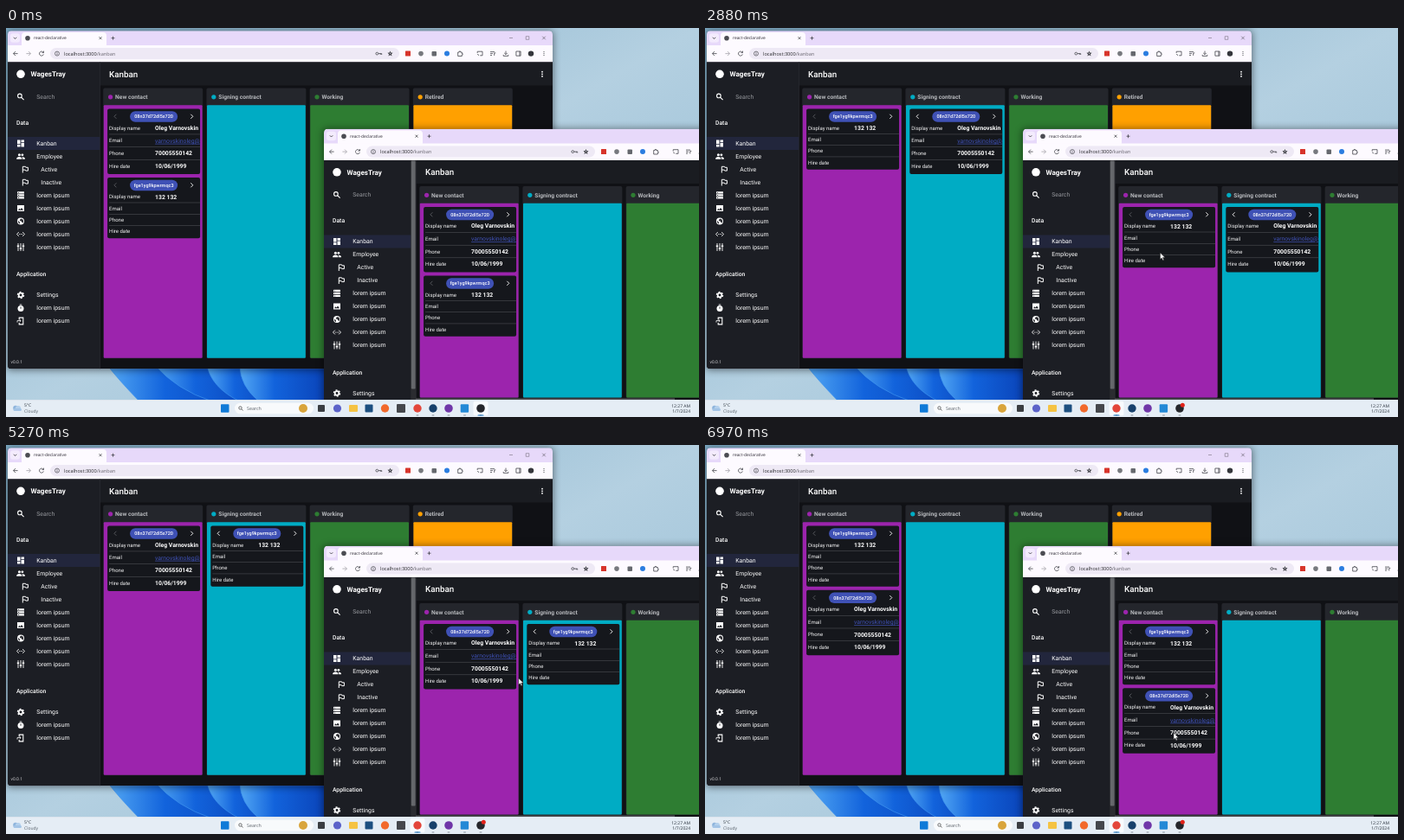
Animation of 800x450 px, one loop 7 s. Source, as an HTML page:

```html
<!DOCTYPE html>
<html lang="en">
<head>
<meta charset="utf-8">
<title>Kanban</title>
<style>
html, body { margin: 0; width: 100%; height: 100%; overflow: hidden; background: #a9c8dc; }
svg { display: block; width: 100vw; height: 100vh; }
text { font-family: Roboto, sans-serif; text-rendering: geometricPrecision; white-space: pre; }
.ui { font-family: "Open Sans", sans-serif; }
</style>
</head>
<body>
<svg id="stage" viewBox="0 0 800 450" xmlns="http://www.w3.org/2000/svg"></svg>
<script>
const LOOP = 7000;
const BLUE = '#3f51b5', INK = '#303136', PALE = '#c9cacd';
const COLS = [
  ['New contact', '#9c24ad'], ['Signing contract', '#00acc4'],
  ['Working', '#2e7d32'], ['Retired', '#ffa000']
];
const colX = i => 112.8 + i * 119.2;

// Markup helpers; text is placed by its vertical middle.
const rect = (x, y, w, h, fill, rx = 0, more = '') =>
  `<rect x="${x}" y="${y}" width="${w}" height="${h}" rx="${rx}" fill="${fill}" ${more}/>`;
const dot = (x, y, r, fill, more = '') => `<circle cx="${x}" cy="${y}" r="${r}" fill="${fill}" ${more}/>`;
const text = (x, y, s, size, fill, more = '') =>
  `<text x="${x}" y="${y + size * .36}" font-size="${size}" fill="${fill}" ${more}>${s}</text>`;
const stroke = (x, y, d, color, w = 1) =>
  `<path transform="translate(${x} ${y})" d="${d}" fill="none" stroke="${color}" stroke-width="${w}"/>`;
const solid = (x, y, d, color) =>
  `<path transform="translate(${x} ${y})" d="${d}" fill="${color}" fill-rule="evenodd"/>`;
const group = (x, y, body, more = '') => `<g transform="translate(${x} ${y})" ${more}>${body}</g>`;
const bold = 'font-weight="700"', medium = 'font-weight="500"', ui = 'class="ui"';

const LEFT = 'M1.3-2.5l-2.5 2.5 2.5 2.5', RIGHT = 'M-1.3-2.5l2.5 2.5-2.5 2.5', DOWN = 'M-1.7-.8l1.7 1.7 1.7-1.7';
const ICONS = {
  search: (x, y) => stroke(x, y, 'M1.2-.9a2.3 2.3 0 1 0-4.6 0a2.3 2.3 0 1 0 4.6 0M.6.8l3 3', '#fff', 1.1),
  board: (x, y) => solid(x, y, 'M-4-4h3.5v4.5h-3.5zM.5-4h3.5v2.7h-3.5zM-4 1.3h3.5v2.7h-3.5zM.5-.4h3.5v4.4h-3.5z', '#fff'),
  people: (x, y) => dot(x - 1.6, y - 1.7, 1.5, '#fff') + dot(x + 1.9, y - 1.7, 1.4, '#fff') +
    solid(x, y, 'M-4.8 3.2v-1.2q3.2-2.8 6.2 0v1.2zM2.1 3.2v-1.5l-.8-1q2.4-.3 3.6 1.3v1.2z', '#fff'),
  flag: (x, y) => stroke(x, y, 'M-2.7 4v-7.2h3.2l.4 1h2.5v3.8h-2.7l-.5-1h-2.9', '#fff'),
  store: (x, y) => [-3, 0, 3].map(d => rect(x - 4, y + d - 1.2, 8, 2.3, '#fff', .4) + dot(x - 2.4, y + d, .55, INK)).join(''),
  image: (x, y) => solid(x, y, 'M-4-3.5h8v7h-8zM-3 2.3h6l-2-2.8-1.5 2-1.1-1.2z', '#fff'),
  globe: (x, y) => dot(x, y, 4, '#fff') + solid(x, y, 'M-3.2-.8l2.2 2v2q-2.4-1-2.2-4zM1-3l1.9 1.6.3 2.6-1.2.8-1.2-1.8-2-1 .3-1.3z', INK),
  arrows: (x, y) => stroke(x, y, 'M-2.2-2.4l-2.3 2.4 2.3 2.4M2.2-2.4l2.3 2.4-2.3 2.4', '#fff', .9) +
    [-1.7, 0, 1.7].map(d => dot(x + d, y, .55, '#fff')).join(''),
  sliders: (x, y) => [-3, 0, 3].map((d, i) => stroke(x + d, y, 'M0-4.5v9', '#fff', .9) +
    rect(x + d - 1.2, y + (i % 2 ? .8 : -2), 2.4, 1.6, '#fff')).join(''),
  gear: (x, y) => dot(x, y, 2.3, 'none', 'stroke="#fff" stroke-width="1.7"') +
    dot(x, y, 3.6, 'none', 'stroke="#fff" stroke-width="1.3" stroke-dasharray="1.9 1.87"'),
  timer: (x, y) => dot(x, y + .5, 3.5, '#fff') + rect(x - 1.3, y - 4.4, 2.6, .9, '#fff') + stroke(x, y, 'M0-1.5v2.3', INK, .9),
  phone: (x, y) => stroke(x, y, 'M-1.8-1.5v-2.4h4.6v7.8h-4.6v-2', '#fff', 1.1) + stroke(x, y, 'M-4 1.6v-2h4M-1.3-1.8l1.5 1.4-1.5 1.4', '#fff', .8)
};

const MENU = [
  ['board', 'Kanban', 133.5], ['people', 'Employee', 148.5], ['flag', 'Active', 163.5, 5], ['flag', 'Inactive', 178.5, 5],
  ['store', 'lorem ipsum', 193.5], ['image', 'lorem ipsum', 208.5], ['globe', 'lorem ipsum', 223.5],
  ['arrows', 'lorem ipsum', 238.5], ['sliders', 'lorem ipsum', 253.5],
  ['gear', 'Settings', 309], ['timer', 'lorem ipsum', 324], ['phone', 'lorem ipsum', 339]
];

const CARDS = {
  a: { id: '08n37d72dl5s720', h: 75.5, rows: [22, 36.8, 51.5, 66],
       vals: ['Oleg Varnovskin', 'varnovskinoleg@example', '70005550142', '10/06/1999'] },
  b: { id: 'fge1yg9kpwrmqc3', h: 70.3, rows: [22.3, 35.6, 48.8, 62], vals: ['132 132', '', '', ''] }
};
const LABELS = ['Display name', 'Email', 'Phone', 'Hire date'];

function card(key, x, y, col) {
  const { id, h, rows, vals } = CARDS[key];
  let s = rect(0, 0, 107, h, '#15171c', 2) + rect(26, 2.8, 55, 12.4, BLUE, 6.2) +
    text(53.5, 8.9, id, 5.5, '#fff', 'text-anchor="middle" ' + medium) +
    stroke(9, 8.8, LEFT, col ? '#fff' : '#5c5e63', .9) + stroke(97.5, 8.8, RIGHT, '#fff', .9);
  rows.forEach((r, i) => {
    if (i) s += rect(2, (r + rows[i - 1]) / 2 - .2, 105, .5, '#55575c');
    s += text(2, r, LABELS[i], 6, '#f4f4f5');
    s += i === 1
      ? text(55, r, vals[i], 6.8, BLUE, 'text-decoration="underline" clip-path="url(#cardClip)"')
      : text(55, r, vals[i], 6.8, '#fff', bold);
  });
  return group(x, y, s);
}

const stack = lists => lists.map((list, col) => {
  let y = 93.5;
  return [...list].map(key => {
    const s = card(key, colX(col) + 4.3, y, col);
    y += CARDS[key].h + 4;
    return s;
  }).join('');
}).join('');

function toolbar(shift) {
  const x = v => v + shift, y = 29.6, c = '#45464c';
  return stroke(11, y, 'M2.6 0h-5M0-2.5l-2.5 2.5 2.5 2.5', c, .8) +
    stroke(26, y, 'M-2.6 0h5M0-2.5l2.5 2.5-2.5 2.5', '#a5a3aa', .8) +
    stroke(41, y, 'M2.2-1.2a2.5 2.5 0 1 0 .2 2M2.5-3v2h-2', c, .8) +
    rect(51, 23, x(454) - 51, 13, '#eee9f5', 6.5) +
    dot(59, y, 2.5, 'none', `stroke="${c}" stroke-width=".7"`) + stroke(59, y, 'M0-.4v1.8M0-1.5v.6', c, .7) +
    text(67, y, 'localhost:3000<tspan fill="#696670">/kanban</tspan>', 5.6, '#28282c', ui) +
    dot(x(428.3), y, 1.4, 'none', `stroke="${c}" stroke-width=".8"`) + stroke(x(430), y, 'M0 0h3.7v1.4M2.3 0v1.2', c, .8) +
    solid(x(443.5), y, 'M0-3l.9 2 2.2.2-1.7 1.4.6 2.2-2-1.2-2 1.2.6-2.2-1.7-1.4 2.2-.2zM0-1.2l-.5 1.2.5 1 .5-1z', c) +
    rect(x(461), 26.6, 6, 6, '#d7342b', .5) + dot(x(479), y, 2.8, '#77797e') + rect(x(491.5), 27, 5.5, 5.5, '#66686e', 1) +
    dot(x(509), y, 3, '#2b7de0') + stroke(x(524), y, 'M-2.3-1.6h1.5v-1h1.5v1h1.6v1.5h.8v1.5h-.8v1.5h-4.6z', c, .8) +
    stroke(x(547), y, 'M-2.8-.6v-1.8h5.8v4.6h-2.8M-2.8.8q1.4 0 1.4 1.4', c, .8) +
    stroke(x(562), y, 'M-3-2h5M-3 0h3M-3 2h2M1.7 2.3v-3h1.6', c, .8) +
    stroke(x(577), y, 'M0-3v4M-1.8-.7l1.8 1.8 1.8-1.8M-2.8 1.3v1.5h5.6v-1.5', c, .8) +
    stroke(x(591.5), y, 'M-2.6-2.6h5.2v5.2h-5.2zM1.4-2.6v5.2', c, .8) +
    dot(x(606), y, 3.2, '#34353b') + [-2, 0, 2].map(d => dot(x(621), y + d, .6, c)).join('');
}

function browser(n, x, y, w, h, colEnd, shift) {
  let s = rect(2, 3.2, w, h, '#e7d9fa', 4) +
    rect(5, 6.3, 11, 10.5, '#f3ebfd', 3) + stroke(10.5, 11.6, DOWN, INK, .8) +
    rect(18, 5, 98, 18, '#fdfaff', 4) + rect(2, 20, w, 19.5, '#fdfaff') +
    dot(25, 11.7, 2.8, '#4b4c52') + text(32, 11.7, 'react-declarative', 4.9, '#2d2b33', ui) +
    stroke(109, 11.7, 'M-1.5-1.5l3 3M1.5-1.5l-3 3', INK, .7) + stroke(123.5, 11.7, 'M-2 0h4M0-2v4', INK, .7) +
    stroke(583, 11.5, 'M-2 0h4', '#77717f', .6) + stroke(602, 11.5, 'M-1.8-1.8h3.6v3.6h-3.6z', '#77717f', .6) +
    stroke(621, 11.5, 'M-1.8-1.8l3.6 3.6M1.8-1.8l-3.6 3.6', '#55505c', .6) + toolbar(shift);

  s += rect(2, 39.5, w, h - 36.3, '#101115') + rect(108, 39.5, w - 106, 27, '#1a1c21') +
    rect(2, 39.5, 106.5, h - 36.3, '#1c1e24') + rect(108.3, 39.5, .5, h, '#303238') +
    dot(17, 53.3, 4.8, '#fff') + text(28.5, 53.2, 'WagesTray', 8.1, '#fff', bold) +
    text(119, 53.2, 'Kanban', 9.8, '#fff', medium) +
    [-2.6, 0, 2.6].map(d => dot(619 + shift, 53.3 + d, .9, '#fff')).join('') +
    ICONS.search(17, 79.3) + text(35.3, 79.3, 'Search', 6.8, '#96989d') +
    text(12, 109.3, 'Data', 6.8, '#fff', medium) + text(12, 284.7, 'Application', 6.8, '#fff', medium) +
    rect(2, 126, 106.3, 15, '#22263c');
  for (const [icon, label, my, indent = 0] of MENU)
    s += ICONS[icon](17 + indent, my) + text(35.3 + indent, my, label, 6.9, '#fff');
  s += n ? rect(102.3, 39.5, 5.8, h, '#2b2c30') + rect(102.8, 40, 4.8, 264, '#65676b', 1)
         : text(5.5, 386, 'v0.0.1', 5, '#d0d1d4');

  COLS.forEach(([name, color], i) => {
    const cx = colX(i);
    s += rect(cx - .6, 69.5, 115, colEnd - 69, '#24262c', 2) +
      dot(cx + 7.8, 79.8, 2.6, color, `id="dot${n}${i}"`) + text(cx + 13.3, 79.8, name, 6.7, '#b6b8bc', bold) +
      rect(cx, 89.3, 113.8, colEnd - 89.3, color, 1, `id="col${n}${i}"`);
  });
  s += `<g id="cards${n}"></g>`;
  if (n) s += rect(108, 314.8, 299, 2, '#4a4b4f');
  return group(x, y, rect(1, 3, w + 2, h + 2, '#000', 4, 'opacity=".45" filter="url(#soft)"') +
    `<g clip-path="url(#win${n})">${s}</g>`);
}

const winClip = (n, w, h) => `<clipPath id="win${n}">${rect(2, 3.2, w, h, '#000', 4)}</clipPath>`;
const defs = `<defs>
  <linearGradient id="sky" x2="1" y2="1"><stop stop-color="#7fadc8"/><stop offset=".5" stop-color="#b4d0e1"/><stop offset="1" stop-color="#8fb8d1"/></linearGradient>
  <linearGradient id="petal"><stop stop-color="#53a8f4"/><stop offset=".4" stop-color="#1263dc"/><stop offset="1" stop-color="#0a43b8"/></linearGradient>
  <filter id="soft" x="-10%" y="-10%" width="120%" height="120%"><feGaussianBlur stdDeviation="4"/></filter>
  <clipPath id="cardClip">${rect(0, 0, 107, 80, '#000')}</clipPath>
  ${winClip(0, 629, 391)}${winClip(1, 490, 390)}</defs>`;

const wallpaper = rect(0, 0, 800, 450, 'url(#sky)') +
  ['M117 390q12 16 37 42h130q-75-15-90-42z', 'M172 390q24 28 66 42h50q-38-18-46-42z',
   'M232 390q5 26 38 42h42q-28-20-24-42z', 'M270 390q0 24 22 42h78v-42z']
    .map(d => `<path d="${d}" fill="url(#petal)" stroke="#3d92ee" stroke-width=".7"/>`).join('');

function taskbar() {
  const c = dot, y = 440;
  return rect(0, 430, 800, 20, '#e5edf5') + rect(0, 430, 800, .4, '#cfd9e3') +
    c(11, 439.5, 2.8, '#8fb5dc') + c(14, 440, 3.1, '#b4d0ec') + rect(8.5, 440, 9.5, 3, '#a3c4e6', 1.5) +
    text(21, 436.5, '5°C', 5, '#28313a', ui) + text(21, 443.4, 'Cloudy', 5, '#58616b', ui) +
    rect(248, 435.3, 9.5, 9.5, '#0f7ad8', .8) + rect(264, 433.7, 91, 12.6, '#f8fafc', 6.3) +
    stroke(271, y, 'M1.2-.5a1.7 1.7 0 1 0-3.4 0a1.7 1.7 0 1 0 3.4 0M.8.8l1.7 1.7', '#333', .7) +
    text(278, y, 'Search', 5.3, '#5a6067', ui) + c(343, y, 5, '#d9a53c') +
    rect(360, 436, 8, 8, '#3a3d42', 1) + c(382.5, y, 4.6, '#5b62c9') + rect(396, 436, 10, 8, '#f5c343', 1) +
    rect(414.5, 435.5, 9, 9, '#1c4f80', 1) + c(437.5, y, 4.7, '#f2692b') + rect(451, 435, 10, 10, '#45474c', 1) +
    rect(466.5, 431.7, 17, 16.6, '#f7fafd', 2, 'id="actBrowser"') + rect(539.5, 431.7, 17, 16.6, '#f7fafd', 2, 'id="actRec"') +
    c(475, y, 4.7, '#e3463a') + c(493, y, 4.7, '#17406b') + c(511, y, 4.8, '#7036a8') + rect(524.7, 435.3, 9.4, 9.4, '#2389d6', 1) +
    c(548, y, 4.8, '#25262b') + c(551.3, 436.3, 2.5, '#e2231a', 'id="rec"') +
    [475, 493, 511, 529.5, 548].map(x => rect(x - 1.5, 447.6, 3, .8, '#8a929b', .4)).join('') +
    rect(471.5, 447.4, 7, 1, '#1574c4', .5, 'id="barBrowser"') + rect(544.5, 447.4, 7, 1, '#1574c4', .5, 'id="barRec"') +
    text(790, 436.7, '12:27 AM', 5, '#28313a', 'class="ui" text-anchor="end"') +
    text(790, 443.6, '1/7/2024', 5, '#28313a', 'class="ui" text-anchor="end"');
}

const pointer = `<g id="pointer">
  <path d="M0 0v7.6l1.8-1.6 1.2 2.7 1.2-.5-1.2-2.6h2.5z" fill="#fff" stroke="#222" stroke-width=".45"/>
  <g id="moveMark">${rect(4.6, 7.4, 3, 3, '#e8e8e8', .3, 'stroke="#444" stroke-width=".6"')}</g></g>
  <g id="noDrop">${dot(2.5, 2.5, 2.8, '#fff', 'stroke="#b3202c" stroke-width="1"')}${stroke(2.5, 2.5, 'M-1.8-1.8l3.6 3.6', '#b3202c', 1)}</g>`;

const stage = document.getElementById('stage');
stage.innerHTML = defs + wallpaper + browser(0, 0, 0, 629, 391, 381.7, 0) +
  browser(1, 365, 113.5, 490, 390, 314, -139) + taskbar() + '<g id="ghost" opacity=".7"></g>' + pointer;
const $ = id => document.getElementById(id);

// Board contents per time: New contact, Signing contract.
const STATES = [[0, 'ab', ''], [2350, 'b', 'a'], [3850, '', 'ba'], [5000, 'a', 'b'], [6350, 'ba', '']];
// start, end, card, grab point inside the card, home column
const DRAGS = [
  [1500, 2350, 'a', 37, 49, 0], [3000, 3850, 'b', 39, 53, 0],
  [4250, 5000, 'a', 36.5, 25, 1], [5550, 6350, 'b', 50, 38.5, 1]
];
const PATH = [
  [0, 560, 470], [250, 560, 470], [800, 532, 300], [1210, 519, 255], [1500, 519, 256], [2200, 640, 270], [2350, 642, 270],
  [2880, 525.5, 260], [3000, 521, 260], [3730, 660, 337], [3850, 662, 338], [4250, 637.5, 306],
  [4700, 587, 298], [5000, 535, 293], [5550, 651, 245.5], [5970, 608, 298], [6350, 541, 328], [6970, 541, 333], [LOOP, 541, 333]
];

function pointerAt(t) {
  const i = Math.max(1, PATH.findIndex(p => p[0] > t));
  const [t0, x0, y0] = PATH[i - 1], [t1, x1, y1] = PATH[i];
  const k = (t - t0) / (t1 - t0), e = k * k * (3 - 2 * k);
  return [x0 + (x1 - x0) * e, y0 + (y1 - y0) * e];
}

const cache = {};
function fill(id, key, make) {
  if (cache[id] === key) return;
  cache[id] = key;
  $(id).innerHTML = make();
}
const show = (id, on) => $(id).setAttribute('visibility', on ? 'visible' : 'hidden');
const move = (id, x, y) => $(id).setAttribute('transform', `translate(${x} ${y})`);

function draw(t) {
  [150, 0].forEach((lag, n) => {
    const [, ...lists] = STATES.filter(s => s[0] === 0 || s[0] + lag <= t).pop();
    fill('cards' + n, lists.join('|'), () => stack(lists));
  });

  const [x, y] = pointerAt(t);
  const drag = DRAGS.find(d => t >= d[0] && t < d[1]);
  const over = drag ? (x < 582 ? 0 : 1) : -1;
  const blocked = !!drag && x > 584 && x < 599;
  for (const i of [0, 1])
    for (const part of ['col1', 'dot1']) $(part + i).setAttribute('fill', i === over ? BLUE : COLS[i][1]);

  show('ghost', drag);
  if (drag) {
    const [, , key, gx, gy, home] = drag;
    fill('ghost', key + home, () => card(key, 0, 0, home));
    move('ghost', x - gx, y - gy);
  }
  move('pointer', x, y);
  move('noDrop', x, y);
  show('pointer', !blocked);
  show('moveMark', drag && !blocked);
  show('noDrop', blocked);

  const inBrowser = t >= 1450;
  for (const id of ['actBrowser', 'barBrowser']) show(id, inBrowser);
  for (const id of ['actRec', 'barRec']) show(id, !inBrowser);
  show('rec', t >= 400);
}

const start = performance.now();
function tick() {
  draw((performance.now() - start) % LOOP);
  requestAnimationFrame(tick);
}
tick();
</script>
</body>
</html>
```
